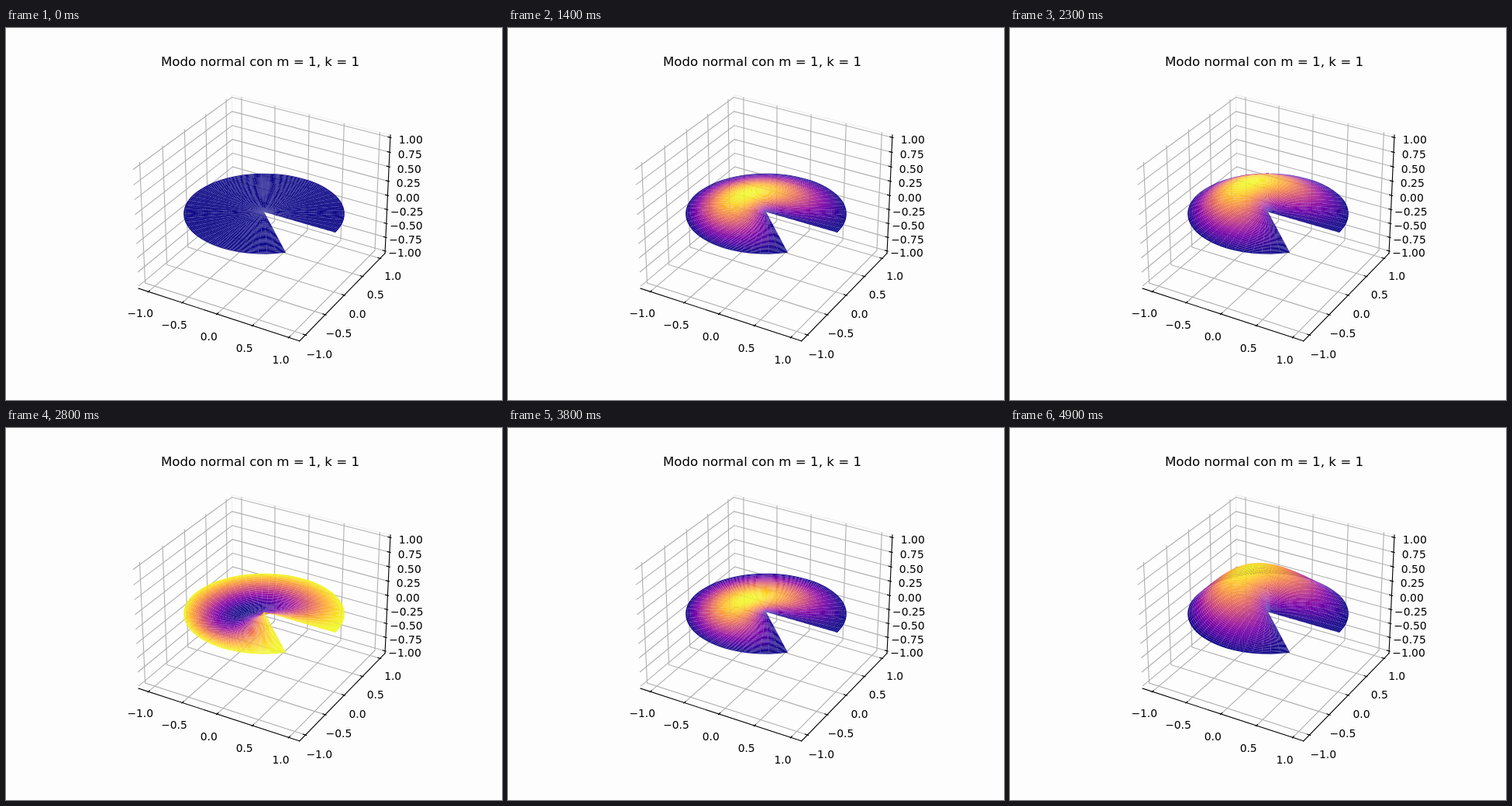
Recreate the animation shown at these times as an HTML page with a canvas. Size 640 by 480 pixels, loop 5000 ms.

```html
<!DOCTYPE html>
<html lang="es">
<head>
<meta charset="utf-8">
<title>Modo normal</title>
<style>
  html, body { margin: 0; width: 100%; height: 100%; overflow: hidden; background: #fdfdfd; }
  svg, canvas { position: absolute; left: 0; top: 0; width: 640px; height: 480px; }
  text { font: 13.889px "DejaVu Sans", sans-serif; text-anchor: middle; fill: #000; }
  .title { font-size: 16.667px; }
  path { fill: none; stroke-width: 1.11; }
  .pane { stroke: #f0f0f0; }
  .grid { stroke: #b0b0b0; }
  .axis { stroke: #000; stroke-linecap: square; }
  .tick { stroke: #000; }
</style>
</head>
<body>
<svg id="axes" viewBox="0 0 640 480"><text class="title" x="328" y="49">Modo normal con m = 1, k = 1</text></svg>
<canvas id="surface" width="640" height="480"></canvas>
<script>
const svg = document.getElementById('axes');
const ctx = document.getElementById('surface').getContext('2d');

// Perspective camera: elevation 30°, azimuth -60°, distance 10.
const COS = Math.sqrt(3) / 2;
function project(x, y, z) {
  x *= 0.51948; y *= 0.51948; z *= 0.428571;
  const depth = 10 - (COS / 2 * x - 0.75 * y + 0.5 * z);
  const scale = 1997.84 / depth;
  return [
    333 + scale * (COS * x + 0.5 * y),
    237.4 - scale * (-0.25 * x + COS / 2 * y + COS * z),
    depth
  ];
}

// ---- Axes ----
const E = 1.1 * 25 / 24, Z = 25 / 24;   // box edges
const OUT = 0.01833, IN = 0.03667;      // tick lengths
const PAD = 0.1902, PAD_Z = 0.1729;     // label offsets

function add(tag, attrs, text) {
  const el = document.createElementNS('http://www.w3.org/2000/svg', tag);
  for (const key in attrs) el.setAttribute(key, attrs[key]);
  if (text) el.textContent = text;
  svg.append(el);
}

function line(kind, ...points) {
  const d = points.map(p => project(...p).slice(0, 2).map(v => v.toFixed(2)).join(' '));
  add('path', { class: kind, d: 'M' + d.join('L') });
}

function label(value, digits, point) {
  const [x, y] = project(...point);
  const text = value.toFixed(digits).replace('-', '\u2212');
  add('text', { x: x.toFixed(2), y: Math.round(y + 11) }, text);
}

const steps = step => Array.from({ length: 2 / step + 1 }, (_, i) => i * step - 1);
const coarse = steps(0.5), fine = steps(0.25);

line('pane', [-E, E, -Z], [-E, E, Z], [E, E, Z], [E, E, -Z]);

for (const v of coarse) {
  line('grid', [v, -E, -Z], [v, E, -Z], [v, E, Z]);
  line('grid', [E, v, -Z], [-E, v, -Z], [-E, v, Z]);
}
for (const v of fine) line('grid', [-E, -E, v], [-E, E, v], [E, E, v]);

line('axis', [-E, -E, -Z], [E, -E, -Z]);
line('axis', [E, -E, -Z], [E, E, -Z]);
line('axis', [E, E, -Z], [E, E, Z]);

for (const v of coarse) {
  line('tick', [v, -E - OUT, -Z], [v, -E + IN, -Z]);
  label(v, 1, [v, -E - PAD, -Z - PAD_Z]);
  line('tick', [E + OUT, v, -Z], [E - IN, v, -Z]);
  label(v, 1, [E + PAD, v, -Z - PAD_Z]);
}
for (const v of fine) {
  line('tick', [E + OUT, E, v], [E - IN, E, v]);
  label(v, 2, [E + PAD, E + PAD, v]);
}

// ---- Membrane: J(root r) sin(order θ) sin(root t) on a 315° sector ----
const ANGLE = 7 * Math.PI / 4, ORDER = 4 / 7, ROOT = 3.2423;
const N = 49, FRAMES = 50, STEP = 100;

function bessel(x) {
  let term = Math.pow(x / 2, ORDER) / 0.89062, sum = term;
  for (let k = 1; k < 14; k++) {
    term *= -x * x / (4 * k * (k + ORDER));
    sum += term;
  }
  return sum;
}

const nodes = [];
for (let i = 0; i <= N; i++) {
  const r = i / N, radial = bessel(ROOT * r);
  for (let j = 0; j <= N; j++) {
    const a = ANGLE * j / N;
    nodes.push([r * Math.cos(a), r * Math.sin(a), radial * Math.sin(ORDER * a)]);
  }
}

const cells = [];
for (let i = 0; i < N; i++) {
  for (let j = 0; j < N; j++) {
    const k = i * (N + 1) + j;
    cells.push([k, k + 1, k + N + 2, k + N + 1]);
  }
}

const plasma = ['0d0887', '46039f', '7201a8', '9c179e', 'bd3786',
                'd8576b', 'ed7953', 'fb9f3a', 'fdca26', 'f0f921']
  .map(hex => [0, 2, 4].map(i => parseInt(hex.substr(i, 2), 16)));

function colour(v) {
  const p = v * 9, i = Math.min(8, Math.floor(p));
  const rgb = plasma[i].map((c, n) => Math.round(c + (plasma[i + 1][n] - c) * (p - i)));
  return `rgb(${rgb})`;
}

function draw(frame) {
  const amp = Math.sin(ROOT * 10 * frame / (FRAMES - 1));
  const points = nodes.map(([x, y, z]) => project(x, y, z * amp));
  let low = Infinity, high = -Infinity;
  const faces = cells.map(cell => {
    let depth = 0, height = 0;
    for (const k of cell) {
      depth += points[k][2];
      height += nodes[k][2] * amp / 4;
    }
    low = Math.min(low, height);
    high = Math.max(high, height);
    return { cell, depth, height };
  });
  faces.sort((a, b) => b.depth - a.depth);

  ctx.clearRect(0, 0, 640, 480);
  for (const { cell, height } of faces) {
    ctx.fillStyle = colour(high > low ? (height - low) / (high - low) : 0);
    ctx.beginPath();
    for (const k of cell) ctx.lineTo(points[k][0], points[k][1]);
    ctx.closePath();
    ctx.fill();
  }
}

let shown = -1;
function tick() {
  const frame = Math.floor(performance.now() / STEP) % FRAMES;
  if (frame !== shown) draw(shown = frame);
  requestAnimationFrame(tick);
}
tick();
</script>
</body>
</html>
```
